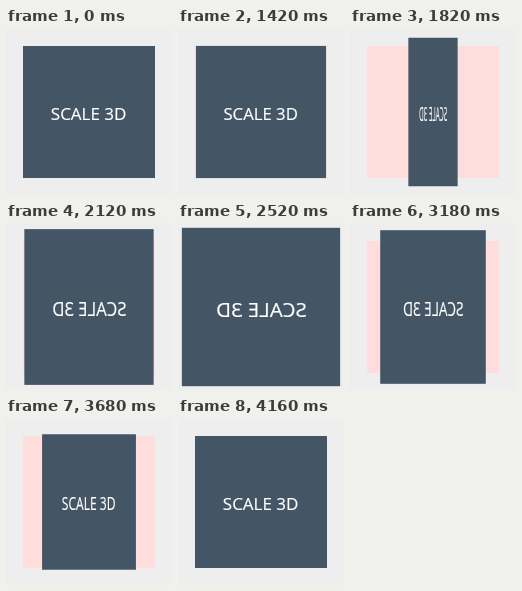
These frames come from a looping animation (166x167 px, 4800 ms). An HTML page:

```html
<!DOCTYPE html>
<html lang="en">
<head>
<meta charset="utf-8">
<title>Scale 3D</title>
<style>
  html, body {
    margin: 0;
    width: 100%;
    height: 100%;
    overflow: hidden;
    background: #eee;
  }
  svg {
    display: block;
  }
  text {
    font: 17px "Open Sans", "Noto Sans", sans-serif;
    text-anchor: middle;
    fill: #fff;
    stroke: #fff;
    stroke-width: 0.2px;
  }
</style>
</head>
<body>
<svg width="166" height="167">
  <rect x="17" y="18" width="132" height="132" fill="#fdd"/>
  <g id="card">
    <rect x="-66" y="-66" width="132" height="132" fill="#456"/>
    <text x="-0.4" y="8">SCALE 3D</text>
  </g>
</svg>
<script>
  const LOOP = 4800;
  const FLIP = { start: 1405, end: 2555 };
  const RETURN = { start: 3008, end: 4175 };
  const card = document.getElementById("card");

  const bezier = (a, b, s) =>
    3 * (1 - s) ** 2 * s * a + 3 * (1 - s) * s ** 2 * b + s ** 3;

  // CSS "ease": cubic-bezier(.25, .1, .25, 1), solved by bisection
  function ease(x) {
    let low = 0, high = 1;
    for (let i = 0; i < 24; i++) {
      const mid = (low + high) / 2;
      if (bezier(0.25, 0.25, mid) < x) low = mid;
      else high = mid;
    }
    return bezier(0.1, 1, low);
  }

  function progress(time, { start, end }) {
    const x = (time - start) / (end - start);
    return x <= 0 ? 0 : x >= 1 ? 1 : ease(x);
  }

  function draw() {
    const time = performance.now() % LOOP;
    const flip = progress(time, FLIP) - progress(time, RETURN);
    card.setAttribute("transform",
      `translate(83 84) scale(${1 - 2.2 * flip} ${1 + 0.2 * flip})`);
    requestAnimationFrame(draw);
  }
  draw();
</script>
</body>
</html>
```
